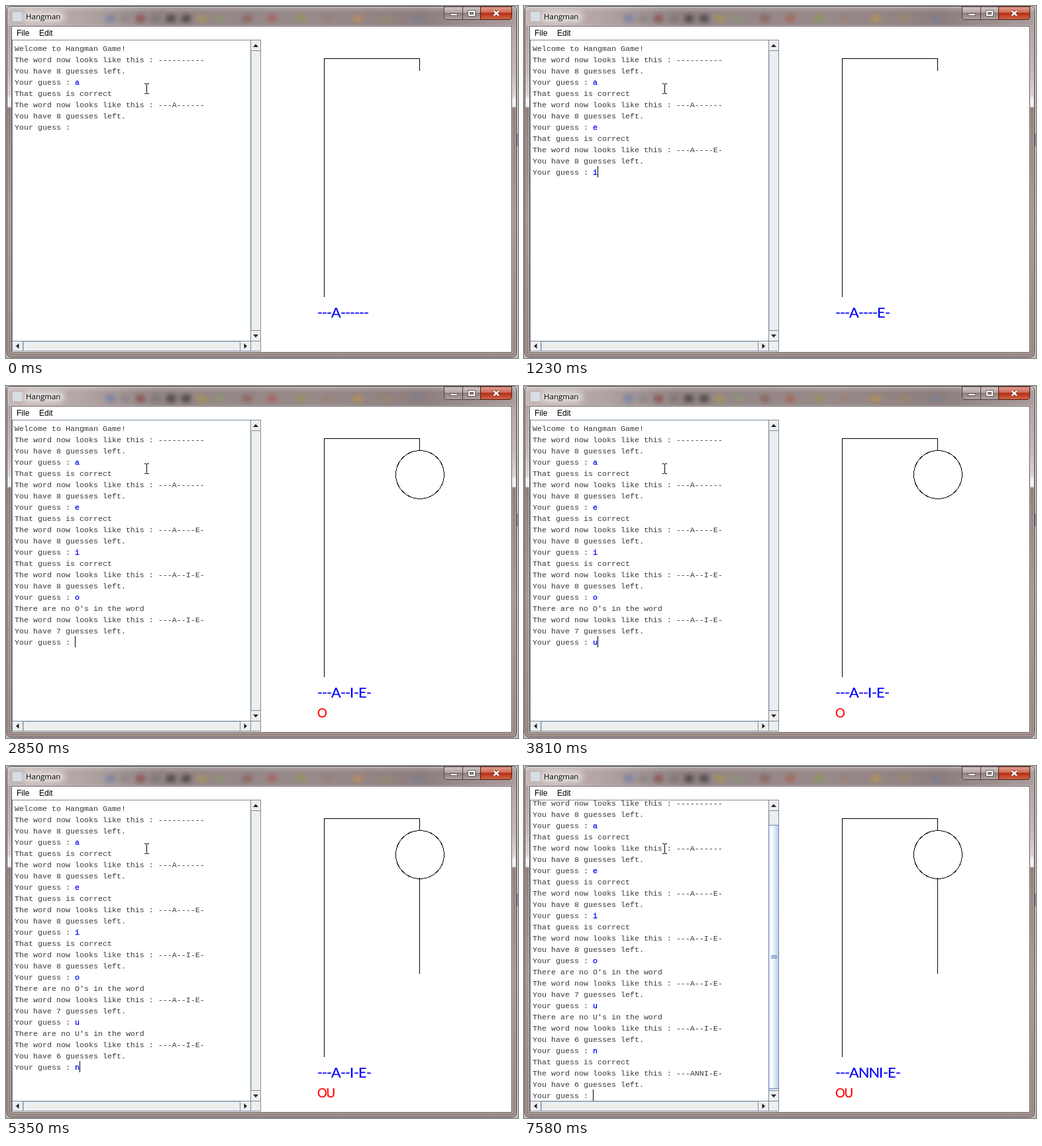
Animation, 773 px wide and 532 px high, one loop 8000 ms. Source, as an HTML page:

```html
<!DOCTYPE html>
<html lang="en">
<head>
<meta charset="utf-8">
<title>Hangman</title>
<style>
html, body { margin: 0; width: 100%; height: 100%; overflow: hidden; background: #fff; }
svg { display: block; }
text { white-space: pre; }
.log { font: 11.667px "Liberation Mono", monospace; fill: #3a3a3a; }
.key { fill: #00f; stroke: #00f; stroke-width: .3; }
.ui { font: 12px "Liberation Sans", sans-serif; fill: #000; }
.title { font: 11.5px "Open Sans", sans-serif; fill: #000; }
.word { font: 21.6px Lato, sans-serif; fill: #00f; stroke: #00f; stroke-width: .2; }
.miss { font: 18.6px Lato, sans-serif; fill: #f00; stroke: #f00; stroke-width: .2; }
.crisp { shape-rendering: crispEdges; }
</style>
</head>
<body>
<svg id="stage" width="773" height="532" viewBox="0 0 773 532">
  <defs>
    <linearGradient id="side" x2="0" y2="1">
      <stop offset="0" stop-color="#a99a9a"/>
      <stop offset=".18" stop-color="#c2b5b3"/>
      <stop offset=".255" stop-color="#dcd4d2"/>
      <stop offset=".265" stop-color="#f4f1f0"/>
      <stop offset=".285" stop-color="#f4f1f0"/>
      <stop offset=".29" stop-color="#8f7c78"/>
      <stop offset=".36" stop-color="#97847f"/>
      <stop offset=".6" stop-color="#a8958f"/>
      <stop offset="1" stop-color="#97857f"/>
    </linearGradient>
    <linearGradient id="bar">
      <stop offset="0" stop-color="#bdafae"/>
      <stop offset=".15" stop-color="#a89998"/>
      <stop offset=".3" stop-color="#857677"/>
      <stop offset=".6" stop-color="#8c7c7c"/>
      <stop offset=".82" stop-color="#806f6f"/>
      <stop offset="1" stop-color="#a09090"/>
    </linearGradient>
    <linearGradient id="shine" x2="0" y2="1">
      <stop offset="0" stop-color="#fff" stop-opacity=".35"/>
      <stop offset=".3" stop-color="#fff" stop-opacity=".1"/>
      <stop offset="1" stop-color="#fff" stop-opacity=".12"/>
    </linearGradient>
    <linearGradient id="glass" x2="0" y2="1">
      <stop offset="0" stop-color="#d5cac9"/>
      <stop offset=".45" stop-color="#b5a6a5"/>
      <stop offset=".5" stop-color="#8d7c7b"/>
      <stop offset="1" stop-color="#b3a3a2"/>
    </linearGradient>
    <linearGradient id="red" x2="0" y2="1">
      <stop offset="0" stop-color="#e3a496"/>
      <stop offset=".45" stop-color="#cd6a55"/>
      <stop offset=".5" stop-color="#b42d14"/>
      <stop offset="1" stop-color="#d2694a"/>
    </linearGradient>
    <linearGradient id="across">
      <stop offset="0" stop-color="#dde8f3"/>
      <stop offset=".3" stop-color="#fff"/>
      <stop offset=".6" stop-color="#dde8f3"/>
      <stop offset="1" stop-color="#b8cfe5"/>
    </linearGradient>
    <filter id="soft" x="-50%" y="-100%" width="200%" height="300%"><feGaussianBlur stdDeviation="3"/></filter>
    <filter id="glow" x="-40%" y="-100%" width="180%" height="300%"><feGaussianBlur stdDeviation="5"/></filter>
    <clipPath id="pane"><rect x="10" y="52" width="359" height="454"/></clipPath>
    <clipPath id="head"><rect x="2" y="1" width="768" height="29"/></clipPath>
  </defs>

  <!-- window frame -->
  <rect width="773" height="532" fill="#c3b9b7"/>
  <rect x="1.5" y=".5" width="769" height="530" rx="6" fill="url(#side)" stroke="#3c3434"/>
  <rect x="771" y="193" width="2" height="19" fill="#4a5a9a" opacity=".5"/>
  <g clip-path="url(#head)">
    <rect x="2" y="1" width="768" height="29" rx="5" fill="url(#bar)"/>
    <g id="spots" filter="url(#soft)"></g>
    <rect x="2" y="1" width="768" height="29" rx="5" fill="url(#shine)"/>
    <rect x="26" y="9" width="62" height="15" rx="6" fill="#fff" opacity=".65" filter="url(#glow)"/>
  </g>
  <rect x="2.5" y="1.5" width="767" height="528" rx="5" fill="none" stroke="#fff" stroke-opacity=".45"/>
  <rect x="7.5" y="29.5" width="757" height="495" fill="none" stroke="#fff" stroke-opacity=".4"/>
  <rect x="10" y="9" width="14" height="14" fill="#d6dde5"/>
  <text class="title" x="30" y="20">Hangman</text>

  <!-- window buttons -->
  <g stroke="#4b3f3f">
    <path d="M661.5 1V16Q661.5 20.5 666 20.5H689.5V1Z" fill="url(#glass)"/>
    <path d="M689.5 1V20.5H716.5V1Z" fill="url(#glass)"/>
    <path d="M716.5 1V20.5H759Q763.5 20.5 763.5 16V1Z" fill="url(#red)" stroke="#4d1a14"/>
    <rect x="670.5" y="11.5" width="11" height="3" fill="#fff" stroke-width=".8"/>
    <path d="M697.5 6.5H708.5V15.5H697.5ZM700.5 9.5V12.5H705.5V9.5Z" fill="#fff" fill-rule="evenodd" stroke-width=".8"/>
  </g>
  <path d="M736.5 7.5L744 14.5M744 7.5L736.5 14.5" stroke="#5b2a25" stroke-width="4"/>
  <path d="M736.5 7.5L744 14.5M744 7.5L736.5 14.5" stroke="#fff" stroke-width="2.4"/>

  <!-- client area -->
  <rect class="crisp" x="8.5" y="30.5" width="755" height="493" fill="#fff" stroke="#5d5252"/>
  <text class="ui" x="16" y="45">File</text>
  <text class="ui" x="50" y="45">Edit</text>

  <!-- scroll pane -->
  <g class="crisp">
    <rect x="369" y="52" width="16" height="470" fill="#eee"/>
    <rect x="9" y="506" width="376" height="16" fill="#eee"/>
    <path d="M370.5 69V490M26 507.5H354M26.5 508V521" stroke="#b8cfe5" fill="none"/>
    <g fill="#eee" stroke="#7a8a99">
      <rect x="369.5" y="51.5" width="15" height="16"/>
      <rect x="369.5" y="490.5" width="15" height="16"/>
      <rect x="9.5" y="506.5" width="16" height="15"/>
      <rect x="353.5" y="506.5" width="16" height="15"/>
      <path d="M9.5 51.5H384.5V521.5H9.5ZM369.5 52V521M10 506.5H384" fill="none"/>
    </g>
    <g id="thumb">
      <rect x="369.5" y="89.5" width="15" height="398" fill="url(#across)" stroke="#6382bf"/>
      <path d="M373 286.5H382M373 288.5H382M373 290.5H382" stroke="#6382bf"/>
    </g>
  </g>
  <path d="M373 62H381L377 57.5ZM373 496.5H381L377 501ZM19.5 510V518L15 514ZM359.5 510V518L364 514Z" fill="#222"/>

  <g clip-path="url(#pane)">
    <g id="log" class="log"></g>
    <rect id="caret" class="crisp" width="1" height="17" fill="#000"/>
  </g>
  <path class="crisp" d="M209 117.5H212M213 117.5H216M212.5 118V132M209 132.5H212M213 132.5H216" stroke="#000" fill="none"/>

  <!-- drawing -->
  <g class="crisp" fill="none" stroke="#000">
    <path d="M480.5 440V79.5H624.5V98"/>
    <circle id="face" cx="625" cy="134" r="36.5"/>
    <path id="body" d="M624.5 169V314"/>
  </g>
  <text id="word" class="word" y="471"></text>
  <text id="miss" class="miss" y="501"></text>
</svg>
<script>
const LOOP = 8000, ROW = 17;
const $ = id => document.getElementById(id);

function add(parent, tag, attrs = {}) {
  const el = document.createElementNS("http://www.w3.org/2000/svg", tag);
  for (const k in attrs) el.setAttribute(k, attrs[k]);
  return parent.appendChild(el);
}

// blurred toolbar showing through the title bar
[[158, "#5a6f9e"], [180, "#7d7375"], [203, "#7a2f2c"], [226, "#6f6063"], [249, "#1e1a1c"],
 [272, "#1e1a1c"], [296, "#a38a3c"], [323, "#7d8a5a"], [364, "#7c4a3c"], [402, "#a04a3a"],
 [445, "#7f8a3e"], [484, "#8b6f5e"], [531, "#b5813c"], [574, "#8a7a55"], [620, "#6a7088"]]
  .forEach(([x, fill]) => add($("spots"), "ellipse", { cx: x, cy: 19, rx: 8, ry: 6, fill, opacity: .7 }));

// key, time typed, time entered, resulting word
const guesses = [
  ["a", -1, -1, "---A------"],
  ["e", 250, 400, "---A----E-"],
  ["i", 1230, 1600, "---A--I-E-"],
  ["o", 2420, 2850, "---A--I-E-"],
  ["u", 3810, 4220, "---A--I-E-"],
  ["n", 5350, 5630, "---ANNI-E-"]
].map(([key, typed, enter, word]) =>
  ({ key, typed, enter, word, up: key.toUpperCase() }));

const caretOff = [[0, 250], [960, 1230], [2150, 2420], [3260, 3810],
                  [4770, 5210], [6160, 6590], [7150, 7580]];

const lines = Array.from({ length: 28 }, (_, i) => {
  const el = add($("log"), "text", { x: 13, y: 68 + i * ROW });
  return { text: add(el, "tspan"), key: add(el, "tspan", { class: "key" }) };
});

// whole-pixel glyph advances of the lettering
const wide = { "-": 7, A: 14, E: 12, I: 6, N: 15.5 };
const narrow = { O: 13.5, U: 13 };

function letter(el, str, advance) {
  let x = 470;
  el.setAttribute("x", [...str].map(c => (x += advance[c]) - advance[c]).join(" "));
  el.textContent = str;
}

function show(el, on) { el.setAttribute("visibility", on ? "visible" : "hidden"); }

function state(t) {
  const rows = [["Welcome to Hangman Game!"]];
  let word = "----------", left = 8, miss = "", typing = false;
  const ask = key => rows.push(["The word now looks like this : " + word],
    [`You have ${left} guesses left.`], ["Your guess : ", key]);
  for (const g of guesses) {
    typing = t >= g.typed;
    ask(typing ? g.key : "");
    if (t < g.enter) return { rows, word, miss, typing };
    const hit = g.word.includes(g.up);
    if (!hit) { left--; miss += g.up; }
    word = g.word;
    rows.push([hit ? "That guess is correct" : `There are no ${g.up}'s in the word`]);
  }
  ask("");
  return { rows, word, miss, typing: false };
}

function draw(t) {
  const { rows, word, miss, typing } = state(t);
  const scroll = rows.length > 26 ? 25 : 0;
  lines.forEach((line, i) => {
    const [text = "", key = ""] = rows[i] || [];
    line.text.textContent = text;
    line.key.textContent = key;
  });
  $("log").setAttribute("transform", `translate(0 ${-scroll})`);
  $("caret").setAttribute("x", typing ? 111 : 104);
  $("caret").setAttribute("y", 55 + (rows.length - 1) * ROW - scroll);
  show($("caret"), !caretOff.some(([a, b]) => t >= a && t < b));
  show($("thumb"), scroll);
  show($("face"), miss.length > 0);
  show($("body"), miss.length > 1);
  letter($("word"), word, wide);
  letter($("miss"), miss, narrow);
}

const start = performance.now();
function tick() {
  draw((performance.now() - start) % LOOP);
  requestAnimationFrame(tick);
}
tick();
</script>
</body>
</html>
```
